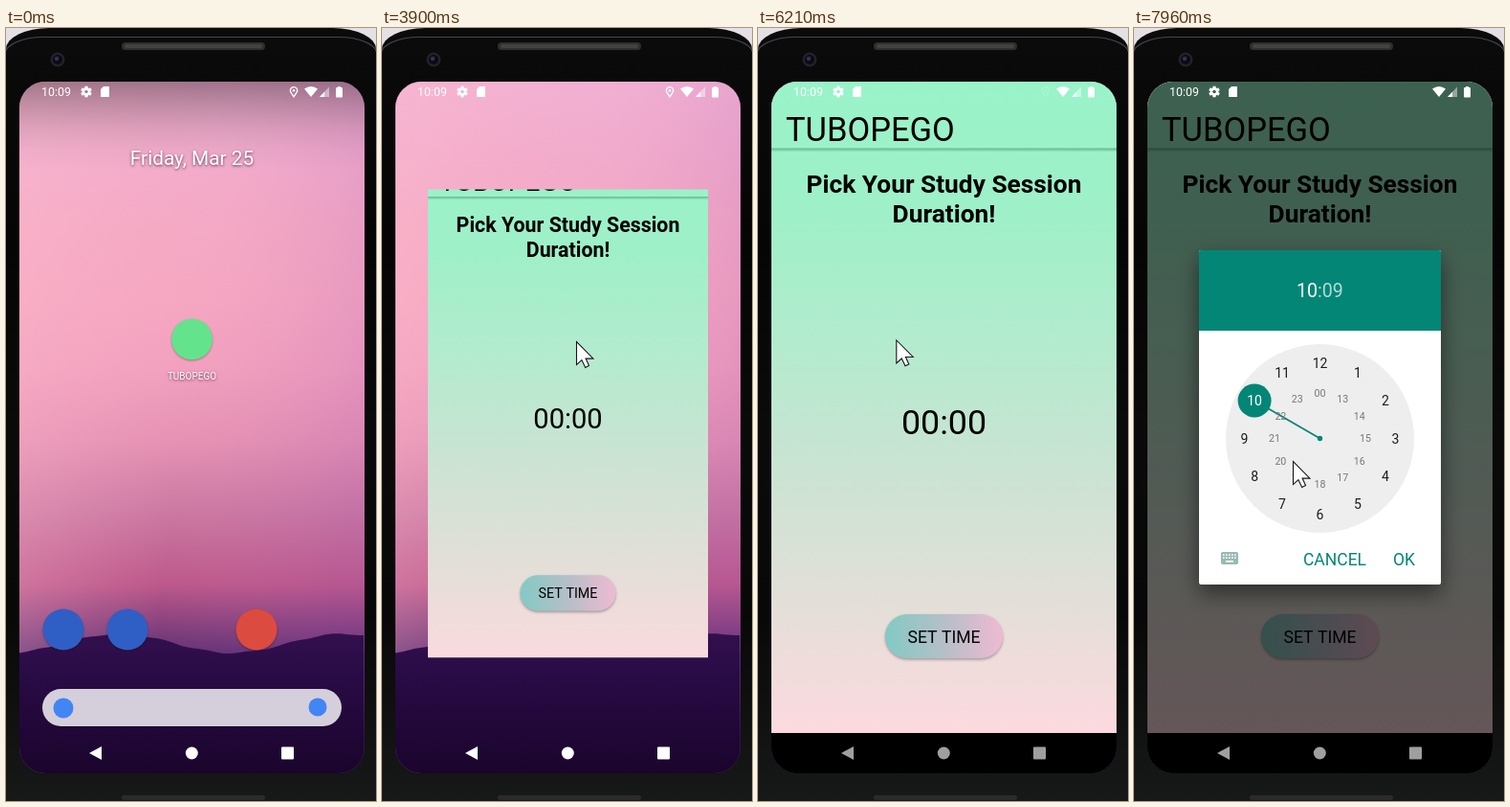
Write an HTML page with a canvas that moves like this. It is 387 px wide and 807 px high and loops after 8 s.

```html
<!DOCTYPE html>
<html lang="en">
<head>
<meta charset="utf-8">
<title>Study timer demo</title>
<style>
html, body { margin: 0; width: 100%; height: 100%; overflow: hidden; background: #000; }
canvas { display: block; width: 387px; height: 807px; }
</style>
</head>
<body>
<canvas id="stage"></canvas>
<script>
const W = 387, H = 807, LOOP = 8000, TAU = Math.PI * 2;
const NAME = 'TUBOPEGO';
const TEAL = '#038676';
const SCREEN = { x: 14, y: 56, w: 361, h: 722, r: 27 };
const CX = SCREEN.x + SCREEN.w / 2, CY = SCREEN.y + SCREEN.h / 2;
const canvas = document.getElementById('stage');
const dpr = window.devicePixelRatio || 1;
canvas.width = W * dpr;
canvas.height = H * dpr;
const c = canvas.getContext('2d');

// Pointer stops; "loop" circles counterclockwise on the way to the next stop.
const STOPS = [
  { t: 450, x: 350, y: 718 },
  { t: 730, x: 290, y: 448 },
  { t: 1000, x: 290, y: 448 },
  { t: 1320, x: 257, y: 311, loop: { turns: 2, rx: 88, ry: 95, from: 0, shrink: .6 } },
  { t: 2720, x: 225, y: 346 },
  { t: 2930, x: 203, y: 327 },
  { t: 4980, x: 203, y: 327 },
  { t: 5170, x: 117, y: 362, loop: { turns: 1, rx: 105, ry: 95, from: -2.4, shrink: 0 } },
  { t: 6300, x: 100, y: 350 },
  { t: 6630, x: 247, y: 645 },
  { t: 6840, x: 226, y: 652 },
  { t: 7580, x: 226, y: 652 },
  { t: 7960, x: 166, y: 452 }
];

const clamp = v => Math.max(0, Math.min(1, v));
const ramp = (t, a, b) => clamp((t - a) / (b - a));
const mix = (a, b, k) => a + (b - a) * k;
const easeOut = (u, n) => 1 - Math.pow(1 - u, n);
const smooth = u => u * u * (3 - 2 * u);

// Gradient with evenly spaced colours
function gradient(x0, y0, x1, y1, ...colors) {
  const g = c.createLinearGradient(x0, y0, x1, y1);
  colors.forEach((col, i) => g.addColorStop(i / (colors.length - 1), col));
  return g;
}
const vertical = (y0, y1, ...colors) => gradient(0, y0, 0, y1, ...colors);

function rect(x, y, w, h, fill) {
  c.fillStyle = fill;
  c.fillRect(x, y, w, h);
}

function roundPath(x, y, w, h, r) {
  c.beginPath();
  c.roundRect(x, y, w, h, r);
}

function roundRect(x, y, w, h, r, fill) {
  roundPath(x, y, w, h, r);
  c.fillStyle = fill;
  c.fill();
}

function circle(x, y, r, fill) {
  c.beginPath();
  c.arc(x, y, r, 0, TAU);
  c.fillStyle = fill;
  c.fill();
}

function poly(points, fill) {
  c.beginPath();
  points.forEach(([x, y]) => c.lineTo(x, y));
  c.closePath();
  c.fillStyle = fill;
  c.fill();
}

function text(str, x, y, size, fill, align = 'center', weight = 400) {
  c.font = `${weight} ${size}px Roboto, sans-serif`;
  c.textAlign = align;
  c.fillStyle = fill;
  c.fillText(str, x, y);
}

function shadow(color, blur, dy) {
  c.shadowColor = color;
  c.shadowBlur = blur * dpr;
  c.shadowOffsetY = dy * dpr;
}

function layer(alpha, draw) {
  if (alpha <= 0) return;
  c.save();
  c.globalAlpha *= alpha;
  draw();
  c.restore();
}

function zoom(s, y, toY = y) {
  c.translate(CX, toY);
  c.scale(s, s);
  c.translate(-CX, -y);
}

function drawBody() {
  rect(0, 0, W, H, '#e4e0e6');
  roundRect(0, 0, W, H + 40, { x: 45, y: 22 }, '#0b0b0b');
  c.lineWidth = 1.2;
  c.strokeStyle = '#4a4350';
  roundPath(-1, 9.5, W + 2, H, { x: 40, y: 18 });
  c.stroke();
  rect(0, 28, W, H - 28, vertical(28, H, '#0a0a0a', '#050505', '#0a0a0a', '#080808', '#171818'));
  roundRect(121, 15, 150, 8, 4, '#30302d');
  roundRect(124, 17, 144, 4, 2, '#44443f');
  roundRect(121, 801, 150, 5, 2, '#2a2b2a');
  circle(54, 33, 7.5, '#22222a');
  circle(54, 33, 5, '#0b0b14');
  circle(53, 32, 2.2, '#35354e');
}

function drawWallpaper() {
  const { x, y, w, h } = SCREEN;
  rect(x, y, w, h, vertical(56, 656, '#f0b1d4', '#f0accd', '#f3a9c4', '#f4a6c1',
    '#f09fbd', '#e28fb2', '#c5739e', '#b54f84', '#4a216a'));
  rect(x, y, w, h, gradient(x, 300, x + w, 340,
    'rgba(255,186,204,.4)', 'rgba(255,170,195,.1)', 'rgba(190,110,185,.25)'));
  c.beginPath();
  c.moveTo(x, y + h);
  for (let px = x; px <= x + w; px += 4)
    c.lineTo(px, 642.5 - 10 * Math.cos((px - 118) / 235 * TAU) + .7 * Math.sin(px / 7));
  c.lineTo(x + w, y + h);
  c.fillStyle = vertical(630, 778, '#33104f', '#280b44', '#220739', '#1a052c');
  c.fill();
}

function drawHome() {
  rect(14, 56, 361, 94, vertical(56, 150,
    'rgba(0,0,0,.34)', 'rgba(0,0,0,.21)', 'rgba(0,0,0,.1)', 'rgba(0,0,0,.03)', 'rgba(0,0,0,0)'));
  shadow('rgba(40,0,30,.7)', 3, 1);
  text('Friday, Mar 25', CX, 143, 20.8, '#fff');
  text(NAME, CX, 367, 10, '#fff');
  shadow('rgba(0,0,0,.3)', 2, 1);
  circle(CX, 325, 21.5, '#64e38d');
  circle(60, 628, 21.5, '#2f5fc4');
  circle(127, 628, 21.5, '#2f5fc4');
  circle(262, 628, 21.5, '#dc4b3f');
  roundRect(38, 690, 313, 39, 19.5, '#d5cfdb');
  shadow('transparent', 0, 0);
  circle(60, 710, 10.5, '#4285f4');
  circle(326, 709, 9.5, '#4285f4');
}

function drawButton(lift) {
  c.save();
  shadow(`rgba(0,0,0,${mix(.32, .4, lift)})`, mix(3, 9, lift), mix(1.5, 4.5, lift));
  roundRect(133, 612, 123, 46, 23, gradient(133, 0, 256, 0, '#82cac4', '#b5bfc8', '#efbad2'));
  c.restore();
  text('SET TIME', CX, 641.5, 17.6, '#000');
}

function drawApp(lift) {
  rect(14, 56, 361, 680, vertical(56, 736, '#99f3c9', '#9ef0c8', '#b3ebce', '#cbe3d3', '#e3dfd8', '#fdd9df'));
  rect(14, 736, 361, 42, '#000');
  rect(14, 125.5, 361, 4, vertical(125.5, 129.5, 'rgba(0,60,40,.35)', 'rgba(0,60,40,0)'));
  text(NAME, 29, 118, 34.5, '#000', 'left');
  text('Pick Your Study Session', CX, 171.5, 26.3, '#000', 'center', 700);
  text('Duration!', CX, 202.5, 26.3, '#000', 'center', 700);
  text('00:00', CX, 424, 35.8, '#000');
  drawButton(lift);
}

// The window grows out of the icon while its vertical crop opens up.
function drawWindow(t, lift) {
  const u = ramp(t, 3560, 4300);
  const inset = mix(180, 0, easeOut(u, 1.775));
  layer(clamp(u * 5), () => {
    zoom(mix(.12, 1, easeOut(u, 2.5)), CY, mix(325, CY, easeOut(u, 5)));
    c.beginPath();
    c.rect(SCREEN.x, SCREEN.y + inset, SCREEN.w, SCREEN.h - inset * 2);
    c.clip();
    drawApp(lift);
  });
}

function drawGear(x, y) {
  c.save();
  c.translate(x, y);
  c.fillStyle = c.strokeStyle = '#fff';
  for (let i = 0; i < 6; i++) {
    c.rotate(TAU / 6);
    c.fillRect(-1.6, -5.8, 3.2, 4);
  }
  c.lineWidth = 2.4;
  c.beginPath();
  c.arc(0, 0, 3.2, 0, TAU);
  c.stroke();
  c.restore();
}

function drawPin(x, y) {
  c.strokeStyle = '#fff';
  c.lineWidth = 1.3;
  c.beginPath();
  c.arc(x, y, 3.7, Math.PI * .9, Math.PI * 2.1);
  c.lineTo(x, y + 6.5);
  c.closePath();
  c.stroke();
  circle(x, y, 1.3, '#fff');
}

function drawStatus(pin) {
  text('10:09', 37, 71.3, 12.4, '#fff', 'left');
  drawGear(84, 66.5);
  poly([[102, 61], [108, 61], [108, 72], [99, 72], [99, 64]], '#fff');
  layer(pin, () => drawPin(301, 65.3));
  c.beginPath();
  c.moveTo(319, 72);
  c.lineTo(312, 63.5);
  c.quadraticCurveTo(319, 58.5, 326, 63.5);
  c.fillStyle = '#fff';
  c.fill();
  poly([[328, 72], [338, 61.5], [338, 72]], 'rgba(255,255,255,.45)');
  poly([[328, 72], [333, 66.8], [333, 72]], '#fff');
  roundRect(345, 62, 7, 10.5, 1, '#fff');
  rect(347, 61, 3, 1.5, '#fff');
}

function drawNav(t) {
  const v = Math.round(255 - 58 * ramp(t, 4400, 4840) - 38 * ramp(t, 5200, 5260));
  const col = `rgb(${v},${v},${v})`;
  poly([[87, 757], [100, 750], [100, 764]], col);
  circle(194.3, 757, 6.5, col);
  roundRect(288, 750.5, 13, 13, 1, col);
}

function drawDial(cy) {
  const at = (hour, r) => {
    const a = hour / 12 * TAU;
    return [CX + Math.sin(a) * r, cy - Math.cos(a) * r];
  };
  const [hx, hy] = at(10, 79);
  circle(CX, cy, 98.5, '#eeeeee');
  c.strokeStyle = TEAL;
  c.lineWidth = 1.8;
  c.beginPath();
  c.moveTo(CX, cy);
  c.lineTo(hx, hy);
  c.stroke();
  circle(CX, cy, 2.7, TEAL);
  circle(hx, hy, 17.5, TEAL);
  for (let i = 1; i <= 12; i++) {
    const [ox, oy] = at(i, 79), [ix, iy] = at(i, 47.5);
    text(i, ox, oy + 5, 14, i === 10 ? '#fff' : '#1c1c1c');
    text(i === 12 ? '00' : i + 12, ix, iy + 3.8, 10.6, '#777');
  }
}

function drawKeyboard() {
  roundRect(91, 547, 18, 13, 1.8, '#9ab9b4');
  for (let i = 0; i < 10; i++)
    rect(93 + i % 5 * 3, i < 5 ? 549.3 : 552.3, 1.6, 1.6, '#fff');
  rect(96, 556, 8, 1.7, '#fff');
}

function drawDialog(t) {
  const k = smooth(ramp(t, 7600, 7900));
  layer(k * .6, () => rect(14, 56, 361, 680, '#000'));
  layer(k, () => {
    zoom(mix(.92, 1, k), 406.5);
    c.save();
    shadow('rgba(0,0,0,.5)', 22, 9);
    roundRect(68, 232, 253, 349, 2, '#fff');
    c.restore();
    roundRect(68, 232, 253, 84, [2, 2, 0, 0], TEAL);
    text('10', 192, 281, 19.6, '#fff', 'right');
    text(':09', 192, 281, 19.6, 'rgba(255,255,255,.7)', 'left');
    drawDial(428.5);
    drawKeyboard();
    text('CANCEL', 210, 560.5, 17.5, TEAL);
    text('OK', 282.5, 560.5, 17.5, TEAL);
  });
}

function pointerAt(t) {
  const next = STOPS.findIndex(s => s.t > t);
  if (next < 0) return STOPS[STOPS.length - 1];
  const a = STOPS[next - 1], b = STOPS[next], u = ramp(t, a.t, b.t);
  const x = mix(a.x, b.x, u), y = mix(a.y, b.y, u);
  if (!a.loop) return { x, y };
  const { turns, rx, ry, from, shrink } = a.loop;
  const angle = from - turns * TAU * u, k = 1 - shrink * u;
  return {
    x: x + rx * k * (Math.cos(angle) - Math.cos(from)),
    y: y + ry * k * (Math.sin(angle) - Math.sin(from))
  };
}

function drawPointer(t) {
  if (t < STOPS[0].t) return;
  const { x, y } = pointerAt(t);
  c.save();
  c.translate(x + .5, y + .6);
  poly([[0, 0], [0, 24], [5.4, 19], [9.2, 26.8], [13, 25], [9.6, 17.5], [17.4, 17.5]], '#fff');
  c.strokeStyle = '#15151c';
  c.lineWidth = 1.1;
  c.stroke();
  c.restore();
}

function render(t) {
  c.setTransform(dpr, 0, 0, dpr, 0, 0);
  drawBody();
  c.save();
  roundPath(SCREEN.x, SCREEN.y, SCREEN.w, SCREEN.h, SCREEN.r);
  c.clip();
  drawWallpaper();
  layer(1 - ramp(t, 3560, 3800), drawHome);
  drawWindow(t, ramp(t, 7080, 7300) - ramp(t, 7630, 7900));
  drawDialog(t);
  drawStatus(1 - .85 * ramp(t, 4400, 4640) - .15 * ramp(t, 7600, 7800));
  drawNav(t);
  c.restore();
  drawPointer(t);
}

const start = performance.now();
function tick() {
  render((performance.now() - start) % LOOP);
  requestAnimationFrame(tick);
}
tick();
</script>
</body>
</html>
```
